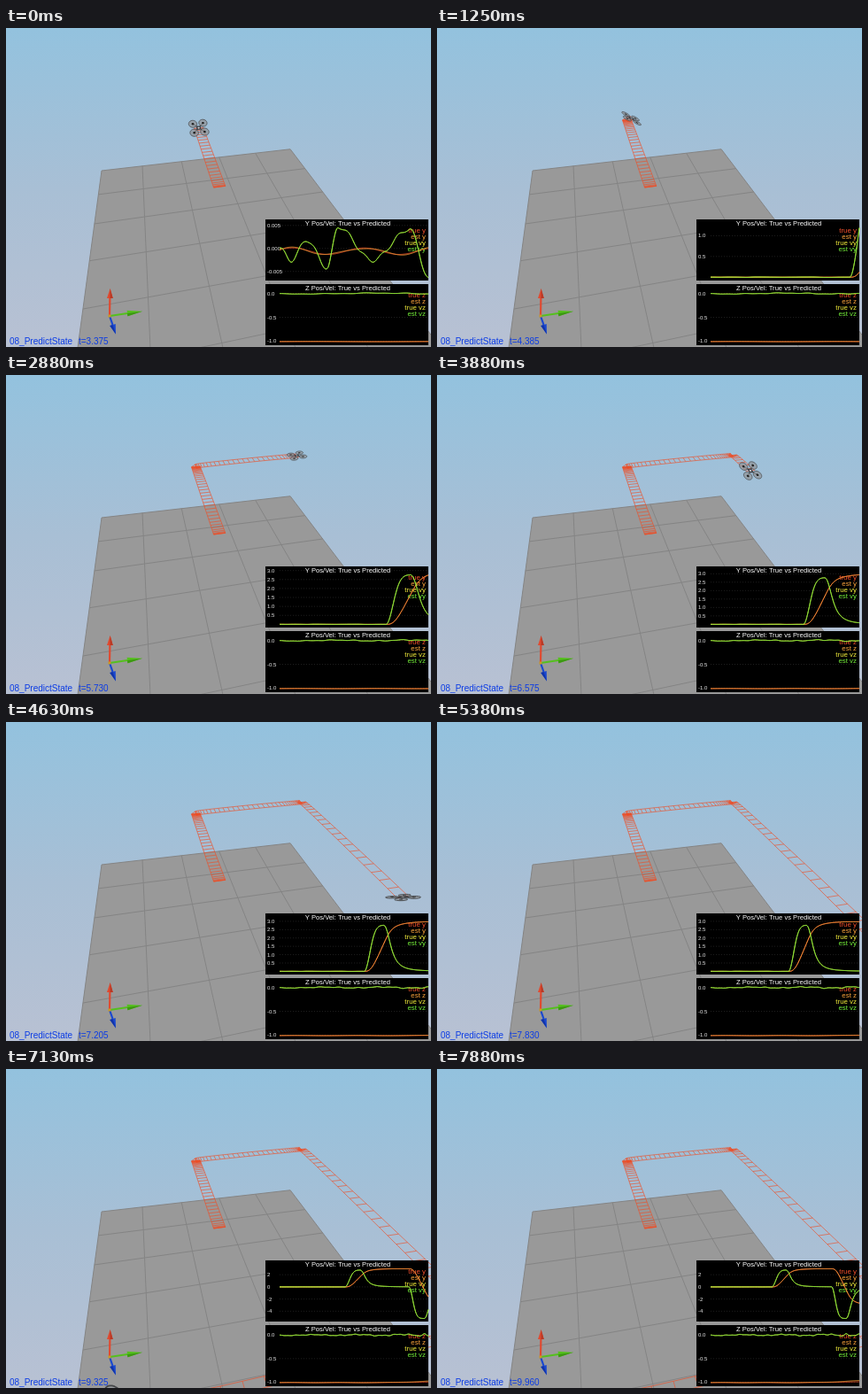
Write an HTML page with a canvas that moves like this. It is 480x360 px and loops after 8000 ms.

```html
<!DOCTYPE html>
<html lang="en">
<head>
<meta charset="utf-8">
<title>Quadrotor state prediction</title>
<style>
  html, body { margin: 0; width: 100%; height: 100%; overflow: hidden; }
  canvas { display: block; }
</style>
</head>
<body>
<canvas id="stage" width="480" height="360"></canvas>
<script>
const ctx = document.getElementById('stage').getContext('2d');
const LOOP = 8000, STEP = 125;
const FONT = '"Liberation Sans", Arial, sans-serif';
const RED = '#f4502c', ORANGE = '#ffa53c', YELLOW = '#f6f03c', GREEN = '#74ee3a';
const TRAIL = 'rgba(236,78,38,0.8)';

// Interpolate key points [x, y], with an optional easing between them
function keys(pts, x, ease = f => f) {
  const i = pts.findIndex(p => x <= p[0]);
  if (i < 0) return pts[pts.length - 1][1];
  if (i === 0) return pts[0][1];
  const [x0, y0] = pts[i - 1], [x1, y1] = pts[i];
  return y0 + (y1 - y0) * ease((x - x0) / (x1 - x0));
}
const smooth = f => f * f * (3 - 2 * f);

// Simulated seconds at each picture step
const clock = [[0, 3.375], [10, 4.385], [23, 5.73], [31, 6.575], [43, 7.83], [51, 8.69], [63, 9.96]];

// ---- Flight: a leg speeds up, cruises and coasts out; distance is its integral ----
function makeLeg(top, rise, cruise, length) {
  const dt = 0.01, sums = [0];
  const speed = s => s <= 0 ? 0
    : top * (1 - Math.exp(-((s / rise) ** 2))) / (1 + (Math.max(0, s - cruise) / 0.4) ** 2.5);
  for (let i = 1; i < 300; i++) sums.push(sums[i - 1] + speed((i - 0.5) * dt) * dt);
  const scale = length / sums[299];
  return {
    speed,
    dist(s) {
      const f = Math.max(0, Math.min(298.999, s / dt)), i = Math.floor(f);
      return scale * (sums[i] + (sums[i + 1] - sums[i]) * (f - i));
    }
  };
}
const short = makeLeg(2.77, 0.38, 0.92, 2.97);
const long = makeLeg(5.2, 0.34, 0.95, 5.9);

// depth grows towards the viewer, side to the right
const depth = t => 3 - short.dist(t - 2.1) + long.dist(t - 6.1);
const side = t => short.dist(t - 4.1) - long.dist(t - 8.1);
const depthSpeed = t => long.speed(t - 6.1) - short.speed(t - 2.1);
const sideSpeed = t => short.speed(t - 4.1) - long.speed(t - 8.1);
const slope = (f, t) => (f(t + 0.08) - f(t - 0.08)) / 0.16;

// ---- Perspective with two vanishing points ----
const VP1 = [143, -98], VP2 = [2400, -100];
function plane(origin, a, b) {
  return (u, v) => {
    const p = a * u, q = b * v, w = 1 + p + q;
    return [0, 1].map(i => (origin[i] + p * VP1[i] + q * VP2[i]) / w);
  };
}
const ground = plane([108, 161], -0.094, 0.0205);
const air = plane([213.5, 101], -0.094, 0.0201);

function path(pts, close) {
  ctx.beginPath();
  pts.forEach(p => ctx.lineTo(p[0], p[1]));
  if (close) ctx.closePath();
}
function line(pts, color, width = 1) {
  path(pts);
  ctx.strokeStyle = color;
  ctx.lineWidth = width;
  ctx.stroke();
}
function shape(pts, color) {
  path(pts, true);
  ctx.fillStyle = color;
  ctx.fill();
}
function text(str, x, y, size, color, align = 'left') {
  ctx.font = size + 'px ' + FONT;
  ctx.textAlign = align;
  ctx.fillStyle = color;
  ctx.fillText(str, x, y);
}

function drawScene() {
  const sky = ctx.createLinearGradient(0, 0, 0, 360);
  sky.addColorStop(0, '#93c2de');
  sky.addColorStop(0.5, '#a8bfd5');
  sky.addColorStop(1, '#b8c1d3');
  ctx.fillStyle = sky;
  ctx.fillRect(0, 0, 480, 360);

  const rows = 7, cols = 5;
  shape([ground(0, 0), ground(0, cols), ground(rows, cols), ground(rows, 0)], '#999999');
  for (let i = 0; i <= rows; i++) line([ground(i, 0), ground(i, cols)], '#848484');
  for (let i = 0; i <= cols; i++) line([ground(0, i), ground(rows, i)], '#848484');
}

function arrow(base, neck, tip, half, color, dark) {
  const dx = tip[0] - neck[0], dy = tip[1] - neck[1], n = Math.hypot(dx, dy);
  const ox = -dy / n * half, oy = dx / n * half;
  line([base, neck], color, 2.2);
  shape([[neck[0] + ox, neck[1] + oy], tip, [neck[0] - ox, neck[1] - oy]], color);
  shape([neck, tip, [neck[0] + ox, neck[1] + oy]], dark);
}
function drawAxes() {
  arrow([117, 325], [117.4, 305], [117.6, 294], 3.4, '#e04a30', '#b83a26');
  arrow([117, 325], [137, 322], [154, 319.7], 3.2, '#55c01e', '#3c9812');
  arrow([117, 325], [120.5, 335], [124, 345.5], 3.4, '#1a48d0', '#1234a8');
  ctx.fillStyle = '#c89a28';
  ctx.fillRect(115.5, 323.5, 3, 3);
}

function drawTrail(t) {
  const left = [], right = [];
  const add = s => {
    const k = depth(s), y = side(s);
    const sideways = (s > 4.1 && s < 6.1) || s > 8.1;
    const h = sideways ? 0.24 / (2 + k * 0.3) : 0.11;
    const a = sideways ? air(k - h, y) : air(k, y - h);
    const b = sideways ? air(k + h, y) : air(k, y + h);
    left.push(a);
    right.push(b);
    line([a, b], TRAIL, 0.8);
  };
  for (let s = 2.1; s < t; s += 0.05) add(s);
  add(t);
  line(left, TRAIL, 0.8);
  line(right, TRAIL, 0.8);
}

function drawDrone(t) {
  const k = depth(t), y = side(t);
  // the craft leans into its acceleration
  const lean = a => Math.max(-7, Math.min(7, a)) / 9.8;
  const pitch = lean(slope(depthSpeed, t)), roll = lean(slope(sideSpeed, t));
  const unit = air(k, y + 0.5)[0] - air(k, y - 0.5)[0];
  const at = (dk, dy) => {
    const p = air(k + dk, y + dy);
    return [p[0], p[1] + (pitch * dk + roll * dy) * unit * 0.85];
  };
  const ring = (dk, dy, r) => Array.from({ length: 24 }, (_, i) => {
    const a = i * Math.PI / 12;
    return at(dk + r * Math.sin(a), dy + r * Math.cos(a));
  });
  const w = Math.max(0.8, unit / 50), arm = 0.125;
  line([at(-arm, -arm), at(arm, arm)], '#333335', 1.3 * w);
  line([at(-arm, arm), at(arm, -arm)], '#333335', 1.3 * w);
  for (const u of [-arm, arm]) for (const v of [-arm, arm]) {
    path(ring(u, v, 0.1), true);
    ctx.fillStyle = 'rgba(146,150,154,0.75)';
    ctx.fill();
    ctx.strokeStyle = '#45474a';
    ctx.lineWidth = 0.8 * w;
    ctx.stroke();
    shape(ring(u, v, 0.03), '#222');
  }
  shape(ring(0, 0, 0.055), '#3a3c40');
  shape(ring(0, 0, 0.025), '#c9ccd0');
}

// ---- Signals ----
const sway = [[0, 0], [0.26, -2.6], [0.62, 1.8], [1.08, -4.2], [1.33, 4.7],
  [2.1, -2.6], [2.95, 4.2], [3.4, -6.7], [4, 0]];
const sideVel = t => sideSpeed(t) + (keys(sway, t, smooth) + 0.4 * Math.sin(t * 17)) / 1000;
const sidePos = t => side(t) - 0.0006 - 0.0007 * Math.cos(3.9 * (t - 1.1));
const vz = t => (0.006 + 0.0012 * t) * (Math.sin(t * 2.3 + 2.8) + 0.6 * Math.sin(t * 7.1) + 0.4 * Math.sin(t * 13.3 + 1))
  - 0.012 * Math.exp(-((t - 0.3) ** 2) * 9) + 0.035 * Math.exp(-((t - 9.1) ** 2) * 60);
const z = t => -1.008 + 0.003 * Math.sin(t * 2.1) + 0.004 * Math.max(0, t - 6) ** 1.7;

const panels = [
  { top: 216, name: 'y', min: -0.0005, max: 0.0005, series: [
    [sidePos, RED], [t => sidePos(t) + 0.0002 * Math.sin(t * 6), ORANGE],
    [sideVel, YELLOW], [sideVel, GREEN]] },
  { top: 289, name: 'z', min: -1.02, max: 0.02, series: [
    [t => -1.01 + 0.4 * (z(t) + 1.01), RED], [z, ORANGE],
    [t => vz(t) * 0.8, YELLOW], [vz, GREEN]] }
];

function drawPanel(p, t) {
  const N = 300, lo = p.top + 65.5, hi = p.top + 9.5;
  ctx.fillStyle = '#000';
  ctx.fillRect(293, p.top, 184, 69);

  const rows = p.series.map(([f]) => Array.from({ length: N + 1 }, (_, i) => f(t * i / N)));
  const min = Math.min(p.min, ...rows.flat()), max = Math.max(p.max, ...rows.flat());
  const range = max - min, toY = v => lo - (v - min) / range * (lo - hi);

  const base = 10 ** Math.floor(Math.log10(range)), m = range / base;
  const step = base * (m < 3.5 ? 0.5 : m < 5 ? 1 : 2);
  const digits = Math.max(0, Math.ceil(-Math.log10(step)));
  for (let i = Math.ceil(min / step); i * step < max + range * 0.1; i++) {
    const y = toY(i * step);
    if (y > lo - 1.05 || y < p.top + 3) continue;
    ctx.setLineDash([1, 2]);
    line([[309, y], [477, y]], '#2b2b2b', 0.7);
    ctx.setLineDash([]);
    text((i * step).toFixed(digits), 295, y + 2, 6, '#f0f0f0');
  }

  text(p.name.toUpperCase() + ' Pos/Vel: True vs Predicted', 386, p.top + 7, 7.6, '#fff', 'center');
  ['true ', 'est ', 'true v', 'est v'].forEach((s, i) =>
    text(s + p.name, 474, p.top + 14.5 + i * 7.3, 7.9, p.series[i][1], 'right'));

  rows.forEach((row, n) =>
    line(row.map((v, i) => [309 + 168 * i / N, toY(v)]), p.series[n][1], 0.85));
}

function draw(ms) {
  const t = Math.round(keys(clock, Math.floor((ms % LOOP) / STEP)) * 200) / 200;
  ctx.lineJoin = 'round';
  drawScene();
  drawAxes();
  drawTrail(t);
  drawDrone(t);
  panels.forEach(p => drawPanel(p, t));
  text('08_PredictState', 4, 357, 10, '#0c3ce4');
  text('t=' + t.toFixed(3), 82, 357, 10, '#0c3ce4');
}

const start = performance.now();
function tick() {
  draw(performance.now() - start);
  requestAnimationFrame(tick);
}
tick();
</script>
</body>
</html>
```
